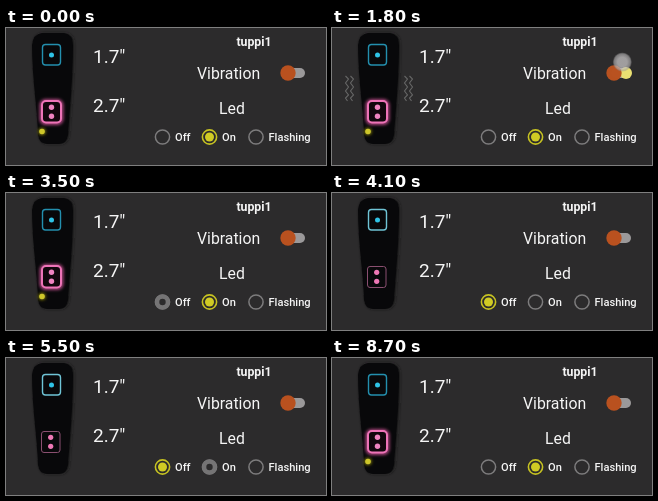
Write an HTML page that moves like this. It is 320 px wide and 137 px high and loops after 8800 ms.

```html
<!DOCTYPE html>
<html lang="en">
<head>
<meta charset="utf-8">
<title>Remote control demo</title>
<style>
  html, body { margin: 0; width: 100%; height: 100%; overflow: hidden; background: #2c2b2c; }
  svg { display: block; width: 100%; height: 100%; }
  text { font-family: Roboto, sans-serif; fill: #f5f5f5; }
</style>
</head>
<body>
<svg viewBox="0 0 320 137">
  <defs>
    <filter id="soft" x="-50%" y="-50%" width="200%" height="200%"><feGaussianBlur stdDeviation="1.8"/></filter>
    <filter id="edge" x="-20%" y="-20%" width="140%" height="140%"><feGaussianBlur stdDeviation="1.8"/></filter>
    <radialGradient id="finger">
      <stop offset="0.5" stop-color="#dedbdc"/>
      <stop offset="0.85" stop-color="#aaa8a9"/>
      <stop offset="1" stop-color="#8a8889" stop-opacity="0.4"/>
    </radialGradient>
    <path id="body" d="M36 5H58Q67 6 67 17C67 50 64 78 62 107Q61 115.5 53 116H41Q33 115.5 32 107C31 78 26 50 26 17Q27 6 36 5Z"/>
    <path id="wave" d="M13.5 48l3 3-3 4 3 4-3 4 3 4-3 3 2 3M18.5 48l3 3-3 4 3 4-3 4 3 4-3 3 2 3" fill="none" stroke="#666" stroke-width="1.1"/>
  </defs>
  <rect width="320" height="137" fill="#2c2b2c"/>

  <use href="#body" x="1" fill="#151415" filter="url(#edge)"/>
  <use href="#body" fill="#08080a"/>
  <rect id="topFrame" x="36.5" y="16.5" width="18" height="20.5" rx="3" stroke-width="1.4" fill="none"/>
  <circle cx="45.5" cy="27" r="2.5" fill="#2fc3e6"/>
  <g id="ledOn">
    <rect x="35.5" y="73" width="20" height="22" rx="4" fill="none" stroke="#a8447c" stroke-width="4" filter="url(#soft)"/>
    <rect x="36" y="73" width="19" height="21.5" rx="4" fill="#12070d" stroke="#ee74b8" stroke-width="2"/>
    <g fill="#f083c1"><circle cx="45.5" cy="79.3" r="2.7"/><circle cx="45.5" cy="88.3" r="2.7"/></g>
    <circle cx="36" cy="103.5" r="3.6" fill="#817b10" filter="url(#soft)"/>
    <circle cx="36" cy="103.5" r="2.8" fill="#cdc62a"/>
  </g>
  <g id="ledOff">
    <rect x="35.5" y="73.5" width="18.5" height="21" rx="2.5" fill="none" stroke="#8a4f70"/>
    <g fill="#ee78b5"><circle cx="44.7" cy="79.3" r="2.6"/><circle cx="44.7" cy="88.3" r="2.6"/></g>
  </g>
  <g id="waves"><use href="#wave"/><use href="#wave" x="59"/></g>

  <g font-size="19">
    <text x="87" y="34.5">1.7"</text>
    <text x="87" y="84">2.7"</text>
  </g>
  <text x="248" y="18.3" font-size="12.3" font-weight="700" text-anchor="middle">tuppi1</text>
  <g font-size="15.8">
    <text x="191" y="51">Vibration</text>
    <text x="213" y="86.3">Led</text>
  </g>

  <rect id="track" x="279" y="40" width="20" height="10" rx="5"/>
  <circle id="thumbOn" cx="294" cy="45" r="6" fill="#e9df72"/>
  <circle id="thumbOff" cy="45" r="7.7" fill="#b9511f"/>

  <g id="radios" font-size="11.1" font-weight="500"></g>
  <circle id="ripple" cy="109" r="5.3" fill="none" stroke="#757475" stroke-width="4.2"/>
  <circle id="touch" r="9.5" fill="url(#finger)"/>
</svg>
<script>
const LOOP = 8800;
const VIBRATE = [1700, 2750], LED_OFF = [3600, 5600];
const $ = id => document.getElementById(id);
const clamp = v => Math.min(1, Math.max(0, v));
const ramp = (t, from, to) => clamp((t - from) / (to - from));
const within = (t, [from, to]) => t >= from && t < to;
const pulse = (t, a, b, c, d) => ramp(t, a, b) * (1 - ramp(t, c, d));
const set = (el, attrs) => Object.entries(attrs).forEach(([k, v]) => el.setAttribute(k, v));

const radios = [["Off", 156.5, 169], ["On", 203.5, 216], ["Flashing", 250, 262.5]].map(([label, x, textX]) => {
  const add = (tag, attrs) => {
    const el = document.createElementNS("http://www.w3.org/2000/svg", tag);
    set(el, attrs);
    return $("radios").appendChild(el);
  };
  const ring = add("circle", { cx: x, cy: 109, r: 7.1, fill: "none" });
  const dot = add("circle", { cx: x, cy: 109, r: 4.5, fill: "#d0cb24" });
  add("text", { x: textX, y: 113.2 }).textContent = label;
  return { ring, dot };
});

function draw(t) {
  const dark = within(t, LED_OFF);
  set($("ledOn"), { opacity: dark ? 0 : 1 });
  set($("ledOff"), { opacity: dark ? 1 : 0 });
  set($("topFrame"), { stroke: dark ? "#6fc4d6" : "#238fae" });
  set($("waves"), { opacity: within(t, VIBRATE) ? 1 : 0 });

  radios.forEach(({ ring, dot }, i) => {
    const selected = i === (dark ? 0 : 1);
    set(ring, { stroke: selected ? "#c6c222" : "#7d7c7d", "stroke-width": selected ? 1.6 : 1.5 });
    set(dot, { opacity: selected ? 1 : 0 });
  });

  // The switch fades to its on state, then slides back.
  const leaving = t >= 2800;
  set($("track"), { fill: within(t, [2700, 3100]) ? "#d2d0d0" : "#9b999a" });
  set($("thumbOn"), { opacity: leaving ? 0 : ramp(t, 1650, 1800) });
  set($("thumbOff"), {
    cx: leaving ? 295 - 13 * ramp(t, 2900, 3150) : 282,
    opacity: leaving ? 1 : 1 - ramp(t, 1800, 2000)
  });

  const second = t > 2400;
  set($("touch"), {
    cx: second ? 295 : 290.3,
    cy: second ? 45 : 34,
    opacity: 0.65 * (second ? pulse(t, 2700, 2800, 3000, 3200) : pulse(t, 1650, 1700, 1850, 2150))
  });
  const pressOn = t > 4500;
  set($("ripple"), {
    cx: pressOn ? 203.5 : 156.5,
    opacity: pressOn ? pulse(t, 5350, 5450, 5550, 5650) : pulse(t, 3400, 3500, 3550, 3650)
  });
}

const start = performance.now();
function tick() {
  draw((performance.now() - start) % LOOP);
  requestAnimationFrame(tick);
}
tick();
</script>
</body>
</html>
```
